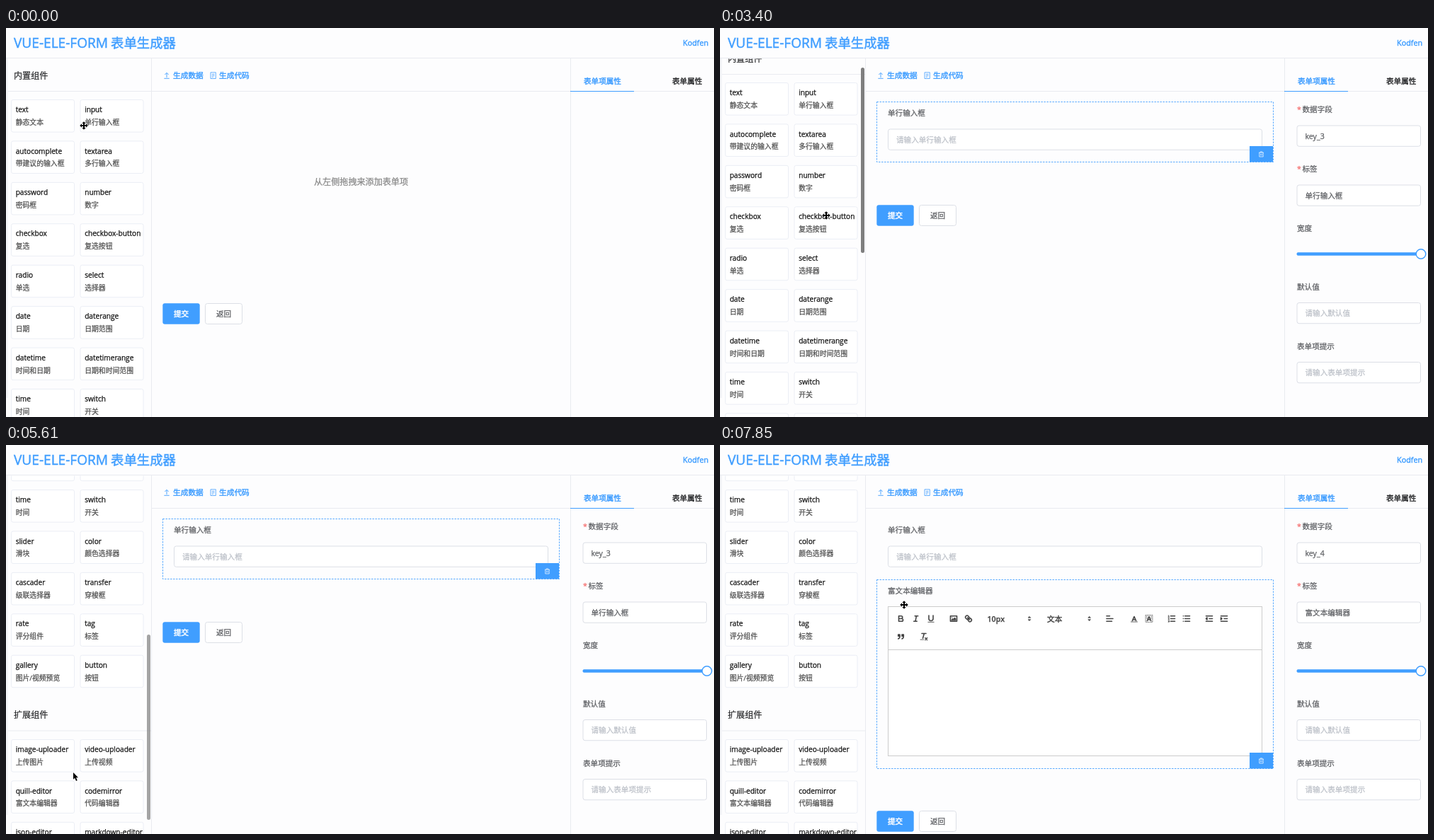
An HTML page that plays this animation: 1000x550 px, repeating every 8 s.

```html
<!DOCTYPE html>
<html lang="zh-CN">
<head>
<meta charset="utf-8">
<title>表单生成器</title>
<style>
  html, body { margin: 0; width: 100%; height: 100%; overflow: hidden; background: #fdfdfe; }
  svg { display: block; width: 1000px; height: 550px; }
  text { font-family: "Open Sans", "Noto Sans CJK SC", "Noto Sans CJK", sans-serif; white-space: pre; stroke-width: .25; }
  .strong { stroke-width: .45; }
  .icon { fill: none; stroke: #444; stroke-width: 2.1; stroke-linecap: round; stroke-linejoin: round; }
  .icon .solid { fill: #444; }
  .icon .thin { stroke-width: 1.1; }
</style>
</head>
<body>
<svg id="stage" viewBox="0 0 1000 550">
  <defs>
    <clipPath id="side"><rect y="43.5" width="205" height="507"/></clipPath>
    <g id="move">
      <path d="M0-5.8L2.7-2.9H1V-1H2.9V-2.7L5.8 0L2.9 2.7V1H1V2.9H2.7L0 5.8L-2.7 2.9H-1V1H-2.9V2.7L-5.8 0L-2.9-2.7V-1H-1V-2.9H-2.7Z"
        fill="#000" stroke="#fff" stroke-width="1" paint-order="stroke"/>
    </g>
    <g id="arrow">
      <path d="M0 0V9.8L2.2 7.8L4 12L5.7 11.3L4 7.2H7Z" fill="#000" stroke="#fff" stroke-width="1.2" paint-order="stroke"/>
    </g>
  </defs>
</svg>
<script>
const BLUE = '#409eff', LINE = '#ebeef5', EDGE = '#dcdfe6', GRAY = '#5c5e62', HINT = '#bcc0c8';
const LOOP = 8000, PITCH = 58.43;

const text = (x, cy, str, size = 10.6, color = GRAY, extra = '') =>
  `<text x="${x}" y="${cy + size * 0.38}" font-size="${size}" fill="${color}" stroke="${color}" ${extra}>${str}</text>`;
const strong = (x, cy, str, size, color, extra = '') => text(x, cy, str, size, color, `class="strong" ${extra}`);
const rect = (x, y, w, h, fill, stroke = 'none', r = 0, extra = '') =>
  `<rect x="${x}" y="${y}" width="${w}" height="${h}" rx="${r}" fill="${fill}" stroke="${stroke}" ${extra}/>`;
const line = (d, color = '#e9ebf0', width = 1) =>
  `<path d="${d}" fill="none" stroke="${color}" stroke-width="${width}"/>`;
const group = (id, body, extra = '') => `<g id="${id}" ${extra}>${body}</g>`;

// Sidebar
const basic = [
  ['text', '静态文本'], ['input', '单行输入框'],
  ['autocomplete', '带建议的输入框'], ['textarea', '多行输入框'],
  ['password', '密码框'], ['number', '数字'],
  ['checkbox', '复选'], ['checkbox-button', '复选按钮'],
  ['radio', '单选'], ['select', '选择器'],
  ['date', '日期'], ['daterange', '日期范围'],
  ['datetime', '时间和日期'], ['datetimerange', '日期和时间范围'],
  ['time', '时间'], ['switch', '开关'],
  ['slider', '滑块'], ['color', '颜色选择器'],
  ['cascader', '级联选择器'], ['transfer', '穿梭框'],
  ['rate', '评分组件'], ['tag', '标签'],
  ['gallery', '图片/视频预览'], ['button', '按钮']
];
const extended = [
  ['image-uploader', '上传图片'], ['video-uploader', '上传视频'],
  ['quill-editor', '富文本编辑器'], ['codemirror', '代码编辑器'],
  ['json-editor', 'JSON 编辑器'], ['markdown-editor', 'markdown 编辑器']
];

const card = ([name, label], x, y, fill = '#fff') =>
  rect(x + 0.5, y + 0.5, 89, 45.6, fill, LINE, 2.5) +
  text(x + 6.7, y + 14.3, name, 10.1, '#111') +
  text(x + 6.7, y + 32.3, label, 9.84, '#505050');
const cards = (list, top) =>
  list.map((c, i) => card(c, i % 2 ? 104.5 : 7, top + (i >> 1) * PITCH)).join('');
const heading = (str, y) => text(11, y, str, 12.1, '#303133') + line(`M3 ${y + 22.5}H205`);

const sidebar = `<g clip-path="url(#side)">` + group('list',
  heading('内置组件', 67) + cards(basic, 101) + heading('扩展组件', 828.5) + cards(extended, 863)) + '</g>' +
  rect(199, 0, 5, 262, '#7f7f7f', 'none', 2.5, 'id="thumb"');

// Fixed frame
const chrome =
  rect(0, 43, 3, 480, '#f4f5f8') +
  strong(11, 21, 'VUE-ELE-FORM', 19.1, BLUE) +
  strong(148, 21, '表单生成器', 18.4, BLUE) +
  strong(956, 20.5, 'Kodfen', 10.8, BLUE) +
  line('M0 42.5H1000M205.5 43V550M797.5 43V550M206 89.5H1000') +
  rect(797, 89, 90, 1, BLUE) +
  line('M227 70V63.5M224.3 66L227 63.3L229.7 66M223.3 71.3H230.7', BLUE, 0.9) +
  line('M289 62.8H296.3V71.5H289ZM290.8 65.3H294.5M290.8 67.3H294.5M290.8 69.3H293', BLUE, 0.8) +
  strong(236, 67, '生成数据', 10.7, BLUE) +
  strong(301, 67, '生成代码', 10.7, BLUE) +
  strong(816, 74.5, '表单项属性', 10.6, BLUE) +
  strong(941, 74.5, '表单属性', 10.6, '#303133');

// Form area
const box = (x, y, w, value, color) =>
  rect(x + 0.5, y + 0.5, w - 1, 29.3, '#fff', EDGE, 3) + text(x + 12, y + 15, value, 10.6, color);
const field = text(237, 120, '单行输入框') + box(237, 142.5, 529, '请输入单行输入框', HINT);

const selection = (top, bottom) =>
  rect(221.5, top, 560, bottom - top, 'none', BLUE, 0, 'stroke-width=".9" stroke-dasharray="2.4 1.6"') +
  rect(748, bottom - 22.5, 33, 22.5, BLUE) +
  `<path transform="translate(764.5 ${bottom - 11})" fill="none" stroke="#fff" stroke-width=".7"
    d="M-3.5-2.3H3.5M-2.7-2.3V3.5H2.7V-2.3M-1.3-2.3V-3.6H1.3V-2.3M-.9-.6V1.8M.9-.6V1.8"/>`;

const icon = (cx, cy, body) =>
  `<g class="icon" transform="translate(${cx} ${cy}) scale(.757) translate(-9 -9)">${body}</g>`;
const stroke = (d, cls = '') => `<path class="${cls}" d="${d}"/>`;
const carets = stroke('M7 11L9 13L11 11ZM7 7L9 5L11 7Z', 'solid thin');
const letterA = stroke('M5.5 13L9 5L12.5 13M6.6 11H11.4');
const indentLines = stroke('M3 14H15M3 4H15M9 9H15');

const tools = [
  [255.5, 245.5, stroke('M5 4H9.5A2.5 2.5 0 0 1 9.5 9H5ZM5 9H10.5A2.5 2.5 0 0 1 10.5 14H5Z')],
  [276.7, 245.5, stroke('M7 4H13M5 14H11M8 14L10 4')],
  [298, 245.5, stroke('M5 3V9A4 4 0 0 0 13 9V3') + stroke('M3.5 15.5H14.5', 'thin')],
  [330, 245.5, stroke('M3 4H15V14H3Z') + stroke('M5.5 7H6.5M5 12V11L7 9L8 10L11 7L13 9V12Z', 'solid thin')],
  [351, 245.5, stroke('M7 7L11 11M8.9 4.6A3.5 3.5 0 0 1 9.3 9.3A3.5 3.5 0 0 1 4.6 8.9C3.2 7.5 2 6.4 4.2 4.2S7.5 3.2 8.9 4.6ZM13.4 9.1A3.5 3.5 0 0 0 8.7 8.7A3.5 3.5 0 0 0 9.1 13.4C10.5 14.8 11.6 16 13.8 13.8S14.8 10.5 13.4 9.1Z')],
  [437, 245.5, carets],
  [521.7, 245.5, carets],
  [550.5, 245.5, stroke('M3 9H15M3 14H13M3 4H9')],
  [585, 245.5, stroke('M3 15H15', 'thin') + letterA],
  [606, 245.5, letterA + '<path class="thin" stroke-dasharray="1 2" d="M2.5 2.5H15.5V15.5H2.5ZM5 4.5V9M13 4.5V9"/>'],
  [638, 245.5, stroke('M7 4H15M7 9H15M7 14H15') + stroke('M2.5 3.5L3.5 2.8V5.8M2.5 5.8H4.5M2.5 8H4.3L2.5 10.3H4.5M2.5 12.5H4.4V15.2H2.5M3 13.8H4.4', 'thin')],
  [659, 245.5, stroke('M6 4H15M6 9H15M6 14H15M2.9 4H3M2.9 9H3M2.9 14H3')],
  [691, 245.5, indentLines + stroke('M5 7V11L3 9Z', 'solid')],
  [712, 245.5, indentLines + stroke('M3 7V11L5 9Z', 'solid')],
  [255.5, 271, stroke('M4 5H7V8H4ZM11 5H14V8H11Z', 'solid') + stroke('M7 8C7 12 4 13 4 13M14 8C14 12 11 13 11 13')],
  [288, 271, stroke('M5 3H13M9.5 3L7 12M11.5 11.5L15 15M15 11.5L11.5 15') + stroke('M2.5 14.5H8.5', 'thin')]
];
const editor =
  text(237, 205.5, '富文本编辑器') +
  rect(237.5, 228.5, 528, 211, '#fff', '#ccc') + line('M237 289.5H766', '#ccc') +
  text(377.5, 245.5, '10px', 10.7, '#444', 'font-weight="600"') +
  strong(462, 245.5, '文本', 10.7, '#444') +
  tools.map(t => icon(...t)).join('');

const buttons = group('buttons',
  rect(221.3, 0.3, 52.4, 29.4, BLUE, 'none', 3) + strong(247.5, 15, '提交', 10.6, '#fff', 'text-anchor="middle"') +
  rect(281.5, 0.5, 52, 29, '#fff', EDGE, 3) + text(307.5, 15, '返回', 10.6, GRAY, 'text-anchor="middle"'));

// Property panel
const label = (y, str, needed) => needed
  ? text(815, y, '*', 10.6, '#f56c6c') + text(822.5, y, str)
  : text(815, y, str);
const panel = (key, name) =>
  label(115, '数据字段', true) + box(814.5, 137.5, 175.5, key, GRAY) +
  label(199, '标签', true) + box(814.5, 221.5, 175.5, name, GRAY) +
  label(283, '宽度') + rect(814.5, 317.2, 175.5, 4.6, BLUE, 'none', 2) +
  `<circle cx="990" cy="319.5" r="6.8" fill="#fff" stroke="${BLUE}" stroke-width="1.5"/>` +
  label(365.5, '默认值') + box(814.5, 388, 175.5, '请输入默认值', HINT) +
  label(449.5, '表单项提示') + box(814.5, 472, 175.5, '请输入表单项提示', HINT);

const states = [
  text(435, 217, '从左侧拖拽来添加表单项', 12.1, '#888'),
  field + selection(104.5, 189.5) + panel('key_3', '单行输入框'),
  field + editor + selection(190.5, 457.5) + panel('key_4', '富文本编辑器')
];
const buttonTops = [389, 250, 517];

document.getElementById('stage').innerHTML +=
  chrome + sidebar + states.map((s, i) => group('state' + i, s)).join('') + buttons +
  group('ghost0', card(basic[1], 0, 0, 'none'), 'opacity=".5"') +
  group('ghost1', card(extended[2], 0, 0, 'none'), 'opacity=".65"') +
  '<use id="cursor"/>';

// Stepped timelines: [start ms, values...]
const M = '#move', A = '#arrow';
const cursorSteps = [
  [0, 110, 138, M], [140, 95, 130, M], [290, 119, 128, M], [440, 132, 127, M], [1040, 131, 122, A],
  [1330, 204, 133, A], [1480, 269, 146, A], [1630, 300, 154, A], [1780, 309, 156, A], [1920, 309, 157, M],
  [2220, 302, 168, M], [2370, 274, 196, A], [2510, 236, 226, A], [2660, 194, 248, A], [2810, 163, 261, M],
  [2950, 150, 265, M], [5160, 143, 312, M], [5310, 123, 376, M], [5460, 103, 438, A], [5610, 95, 463, A],
  [5760, 78, 480, M], [5910, 58, 492, M], [6060, 49, 497, M], [6200, 52, 497, M], [6350, 62, 495, M],
  [6500, 76, 493, M], [6650, 87, 492, M], [6800, 84, 487, A],
  [6950, 140, 420, A], [7100, 208, 316, A], [7250, 257, 236, A], [7400, 261, 224, A], [7550, 261, 222, A],
  [7700, 261, 227, M], [7850, 260, 226, M]
];
const ghostSteps = [
  [0], [1330, 148, 105, 0], [1480, 197.5, 111, 0], [1630, 238, 121, 0], [1780],
  [6950, 92, 406, 1], [7100, 158, 306, 1], [7250, 209.5, 220, 1], [7400, 220, 206, 1], [7550]
];
const scrollSteps = [
  [0, 0], [3250, 5], [3400, 24], [3550, 90], [3700, 180], [3840, 270], [3990, 349], [4140, 392], [4290, 415],
  [4580, 426], [4730, 437], [4870, 443], [5020, 447]
];
const thumbSteps = [[0, 0], [3250, 1], [5610, 0.7], [5760, 0.3], [5910, 0]];
const stateSteps = [[0, 0], [1780, 1], [7550, 2]];

const at = (steps, t) => steps.findLast(s => s[0] <= t).slice(1);
const el = id => document.getElementById(id);
const show = (id, on) => el(id).setAttribute('visibility', on ? 'visible' : 'hidden');
const place = (id, x, y) => el(id).setAttribute('transform', `translate(${x} ${y})`);

function draw() {
  const t = performance.now() % LOOP;
  const [x, y, kind] = at(cursorSteps, t);
  const [gx, gy, dragged] = at(ghostSteps, t);
  const [scroll] = at(scrollSteps, t);
  const [state] = at(stateSteps, t);

  place('cursor', x, y);
  el('cursor').setAttribute('href', kind);
  [0, 1].forEach(i => show('ghost' + i, dragged === i));
  if (dragged !== undefined) place('ghost' + dragged, gx, gy);
  place('list', 0, -scroll);
  place('thumb', 0, 44 + scroll * 0.501);
  el('thumb').setAttribute('opacity', at(thumbSteps, t)[0]);
  states.forEach((_, i) => show('state' + i, state === i));
  place('buttons', 0, buttonTops[state]);
  requestAnimationFrame(draw);
}
draw();
</script>
</body>
</html>
```
